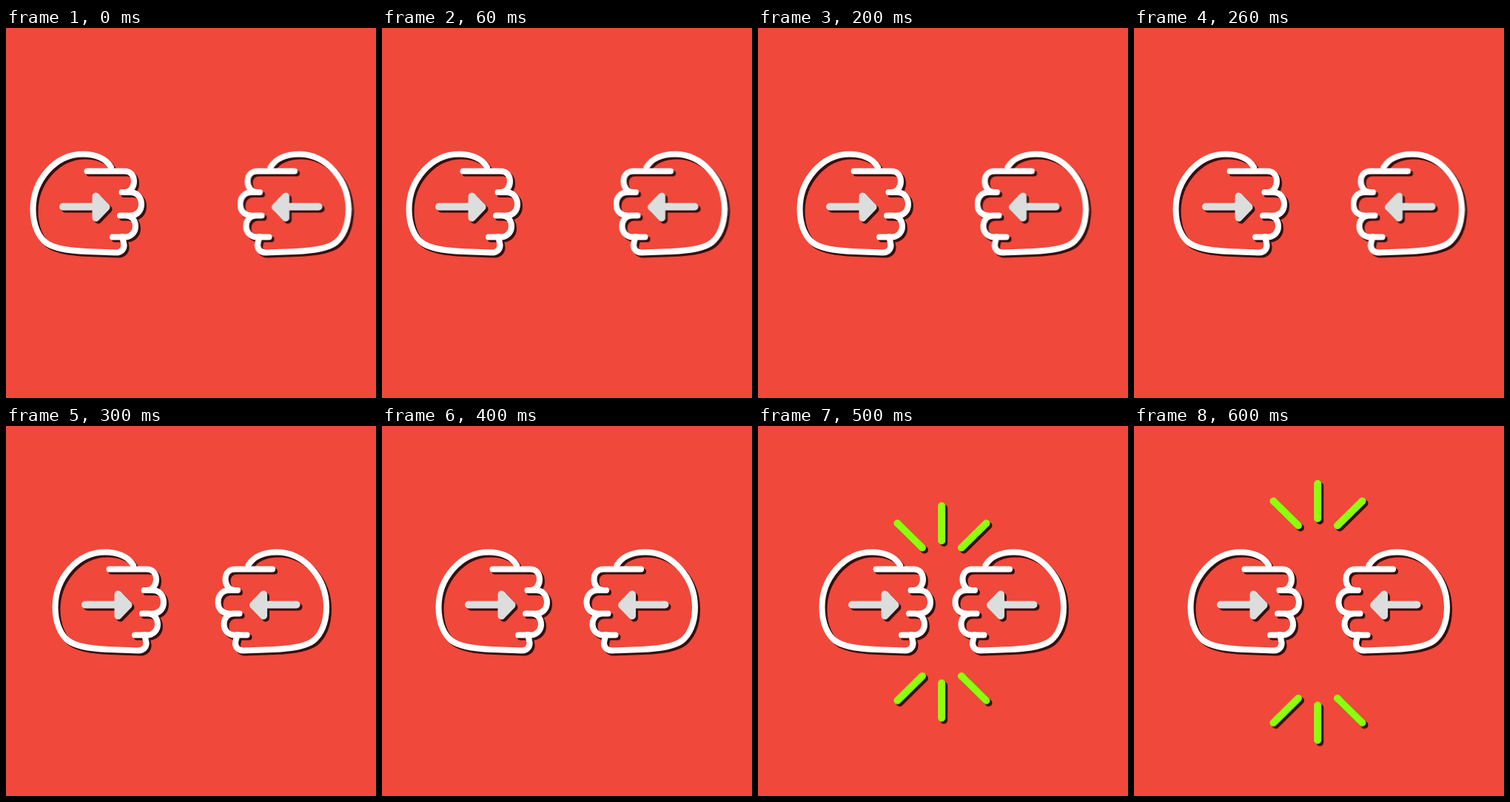
Write an HTML page that moves like this. It is 500 px wide and 500 px high and loops after 700 ms.

```html
<!DOCTYPE html>
<html lang="en">
<head>
<meta charset="utf-8">
<title>Fist bump</title>
<style>
  html, body { margin: 0; height: 100%; overflow: hidden; background: #f0483b; }
  svg { display: block; width: 100vw; height: 100vh; }
  #scene { filter: drop-shadow(3.5px 3.5px .7px rgba(45, 8, 10, .92)); }
</style>
</head>
<body>
<svg viewBox="0 0 500 500">
  <defs>
    <g id="fist">
      <g stroke="#fff" stroke-width="8">
        <path d="M142 188C135 176.500 121 170.500 104 170.500C66 170.500 36.500 206 36.500 245C36.500 268 45 283 54 290C65 298.500 86 301 108 302L149 303.500C157 303.500 161 297 159 290L157 282"/>
        <path d="M109.500 193.500H160C168 193.500 173 199 173 207C173 215 168 222 160 222"/>
        <path d="M156.500 222H168C177 222 183 229 183 238C183 247 177 253.500 168 253.500"/>
        <path d="M154 253.500H162C170 253.500 175 260 175 268C175 276 169 282.500 161 282.500H144"/>
      </g>
      <g stroke="#dcdedd" stroke-width="10">
        <path d="M77 241.500H120"/>
        <path d="M121.500 227.500L135.500 242L121.500 256.500Z" fill="#dcdedd"/>
      </g>
    </g>
    <path id="rays" d="M188.500 131.500L222 164.500M248.200 108V155M308.500 131.500L275 164.500"/>
  </defs>
  <g id="scene" fill="none" stroke-linecap="round" stroke-linejoin="round">
    <use id="left" href="#fist"/>
    <use id="right" href="#fist"/>
    <g id="sparks" stroke="#8eff0c" stroke-width="10">
      <use id="upper" href="#rays"/>
      <use id="lower" href="#rays"/>
    </g>
  </g>
</svg>
<script>
  const STEP = 100, STEPS = 7, HIT = 5;
  const place = (id, value) => document.getElementById(id).setAttribute("transform", value);

  function draw(now) {
    const step = Math.floor(now / STEP) % STEPS;
    const shift = 10 * (HIT - Math.abs(step - HIT));
    const spread = 30 * Math.max(0, step - HIT);

    place("left", `translate(${shift} 0)`);
    place("right", `translate(${499.5 - shift} 0) scale(-1 1)`);
    place("upper", `translate(0 ${-spread})`);
    place("lower", `translate(0 ${502.5 + spread}) scale(1 -1)`);
    document.getElementById("sparks").style.display = step < HIT ? "none" : "";
  }

  const start = performance.now();
  function tick() {
    draw(performance.now() - start);
    requestAnimationFrame(tick);
  }
  tick();
</script>
</body>
</html>
```
